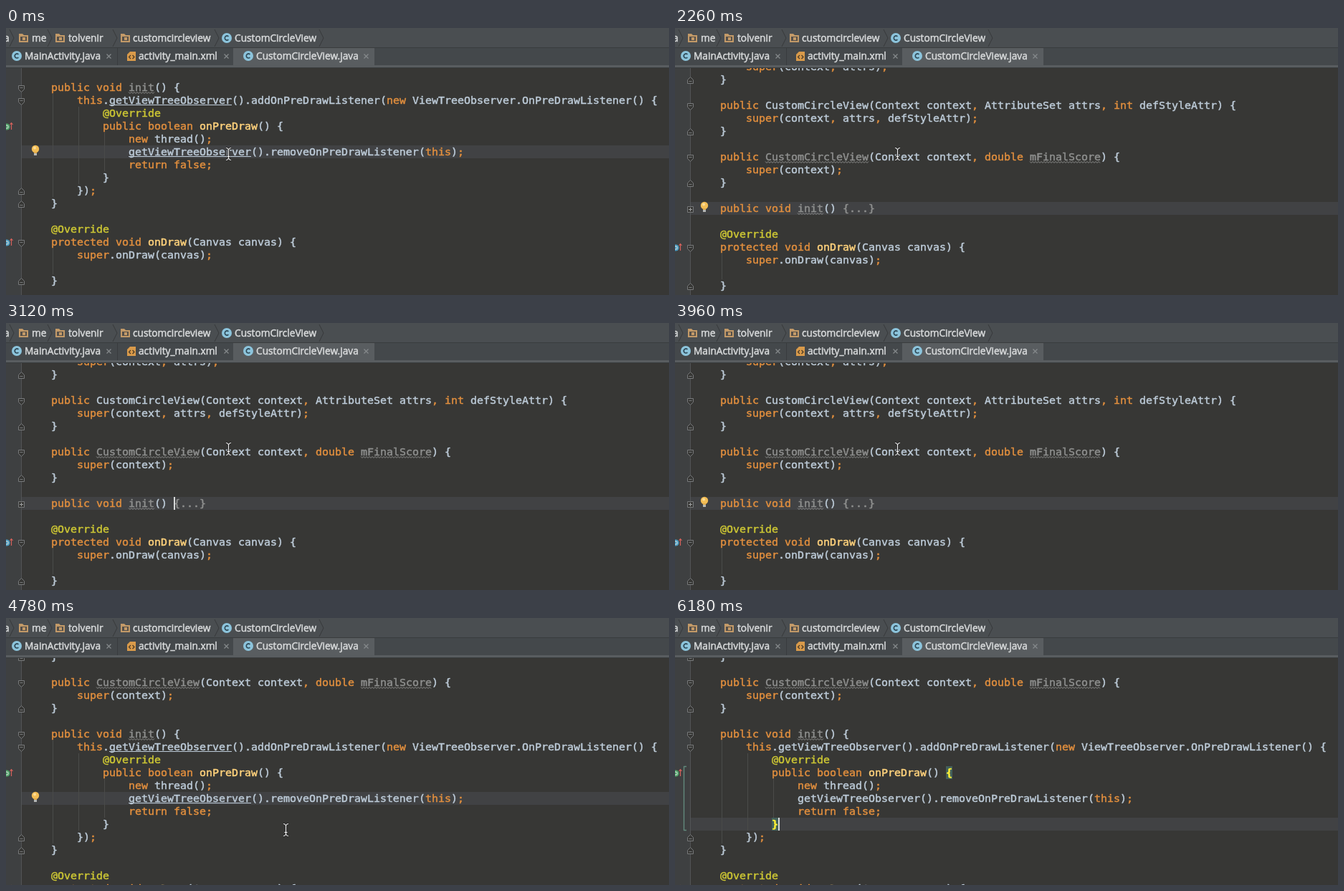
These frames come from a looping animation (925 px wide and 373 px high, 6.45 s). An HTML page with a canvas:

```html
<!DOCTYPE html>
<html lang="en">
<head>
<meta charset="utf-8">
<title>Code folding</title>
<style>
html, body { margin: 0; width: 100%; height: 100%; overflow: hidden; background: #373735; }
canvas { display: block; }
</style>
</head>
<body>
<canvas id="stage" width="925" height="373"></canvas>
<script>
const ctx = document.getElementById('stage').getContext('2d');
const LOOP = 6450, W = 925, H = 373, ROW = 18, CELL = 9, LEFT = 63, TOP = 56;
const CODE_FONT = '14.95px "DejaVu Sans Mono", monospace';
const UI_FONT = '13.7px "Open Sans", "Noto Sans", sans-serif';
const C = {
  bg: '#373735', gutter: '#3e4041', row: '#414244', bar: '#4a4e51', tab: '#44484b',
  active: '#595d60', edge: '#393c3e', text: '#bccad7', key: '#e08e3e', note: '#ccc634',
  method: '#ffd27c', dim: '#8e8f8e', ui: '#d8dadb', mark: '#77797a', guide: '#4a4b49'
};

// A leading ~ marks an unused name: grey with a wavy underline.
const LINES = `    super(context, attrs);
}

public CustomCircleView(Context context, AttributeSet attrs, int defStyleAttr) {
    super(context, attrs, defStyleAttr);
}

public ~CustomCircleView(Context context, double ~mFinalScore) {
    super(context);
}

public void ~init() {
    this.getViewTreeObserver().addOnPreDrawListener(new ViewTreeObserver.OnPreDrawListener() {
        @Override
        public boolean onPreDraw() {
            new thread();
            getViewTreeObserver().removeOnPreDrawListener(this);
            return false;
        }
    });
}

@Override
protected void onDraw(Canvas canvas) {
    super.onDraw(canvas);

}`.split('\n');
const INIT = 11, INIT_END = 20, PRE_DRAW = 14, CALL = 16, PRE_END = 18, DRAW = 23;
const STARTS = [3, 7, 11, 12, 23], ENDS = [1, 5, 9, 19, 20, 26];
const GUIDES = [[12, 19, 0], [13, 18, 4], [15, 17, 8], [24, 25, 0]]; // first, last, column
const KEYWORD = /^(public|protected|void|this|new|boolean|return|false|super|int|double|[;,])$/;
const TOKEN = /~?\w+|@\w+|\s+|[^\s\w]/g;

const CARET_FLIPS = [240, 1220, 1730, 2260, 2320, 3960, 4050, 4780, 4840, 5680, 6180];
const MOUSE = [[0, 310, 176], [4385, 310, 176], [4540, 390, 296], [5080, 390, 296],
  [5300, 729, 351], [5480, 812, 364], [5700, 856, 376]];
const within = (t, ...spans) => spans.some(([a, b]) => t >= a && t < b);

function rect(x, y, w, h, color) {
  ctx.fillStyle = color;
  ctx.fillRect(x, y, w, h);
}

function path(points, stroke, fill, width = 1) {
  ctx.beginPath();
  points.forEach(([x, y]) => ctx.lineTo(x, y));
  if (fill) {
    ctx.closePath();
    ctx.fillStyle = fill;
    ctx.fill();
  }
  if (stroke) {
    ctx.strokeStyle = stroke;
    ctx.lineWidth = width;
    ctx.stroke();
  }
}

function disc(x, y, r, color) {
  ctx.beginPath();
  ctx.arc(x, y, r, 0, 7);
  ctx.fillStyle = color;
  ctx.fill();
}

// The thin outline gives the slightly heavy look of smoothed screen text.
function label(text, x, y, color = C.ui, font = UI_FONT) {
  ctx.font = font;
  ctx.fillStyle = ctx.strokeStyle = color;
  ctx.lineWidth = .5;
  ctx.lineJoin = 'round';
  ctx.fillText(text, x, y);
  ctx.strokeText(text, x, y);
}

function classIcon(x, y) {
  disc(x, y, 7, '#8cc4dc');
  ctx.beginPath();
  ctx.arc(x + .3, y, 3, .8, 5.5);
  ctx.strokeStyle = '#2f4a58';
  ctx.lineWidth = 1.6;
  ctx.stroke();
}

function folder(x) {
  path([[x, 8], [x + 5, 8], [x + 7, 10], [x + 13, 10], [x + 13, 20], [x, 20]], null, '#c39a68');
  rect(x + 2, 12, 9, 6, '#55504a');
  rect(x + 5, 13, 4, 4, '#c39a68');
}

function xmlIcon(x, y) {
  path([[x + 4, y], [x + 12, y], [x + 12, y + 13], [x, y + 13], [x, y + 4]], null, '#d99a4a');
  path([[x + 5, y + 5], [x + 2.5, y + 7.5], [x + 5, y + 10]], '#4a3a26', null, 1.3);
  path([[x + 7.5, y + 5], [x + 10, y + 7.5], [x + 7.5, y + 10]], '#4a3a26', null, 1.3);
}

function cross(x, y) {
  path([[x - 3, y - 3], [x + 3, y + 3]], '#85898b', null, 1.3);
  path([[x - 3, y + 3], [x + 3, y - 3]], '#85898b', null, 1.3);
}

function header() {
  rect(0, 0, W, 28, C.bar);
  rect(0, 27, W, 1, C.edge);
  rect(0, 28, W, 24, C.tab);
  rect(317, 28, 197, 24, C.active);
  rect(155, 28, 1, 24, C.edge);
  rect(0, 52, W, 3, C.active);
  rect(0, 55, W, 1, C.edge);

  label('a', -3, 19);
  [8, 61, 152, 294, 440].forEach(x =>
    path([[x - 3, 2], [x + 3, 14], [x - 3, 26]], '#37393b'));
  [18, 69, 160].forEach(folder);
  label('me', 36, 19);
  label('tolvenir', 87, 19);
  label('customcircleview', 177, 19);
  classIcon(308, 14);
  label('CustomCircleView', 319, 19);

  classIcon(15, 39);
  label('MainActivity.java', 26, 44);
  cross(143.5, 39.5);
  xmlIcon(169, 33);
  label('activity_main.xml', 185, 44);
  cross(307.5, 39.5);
  classIcon(338, 39);
  label('CustomCircleView.java', 349, 44);
  cross(502.5, 39.5);
}

function wave(x, y, width) {
  const points = [];
  for (let i = 0; i <= width; i += 2) points.push([x + i, y + (i % 4 ? 2 : 0)]);
  path(points, C.dim);
}

function colorOf(token, before) {
  if (token[0] === '~') return C.dim;
  if (token[0] === '@') return C.note;
  if (KEYWORD.test(token)) return C.key;
  return /^on/.test(token) && /(void|boolean) $/.test(before) ? C.method : C.text;
}

function codeLine(line, y, underline) {
  let before = '';
  for (const token of line.match(TOKEN) || []) {
    const word = token.replace('~', ''), x = LEFT + before.length * CELL;
    const width = word.length * CELL;
    label(word, x, y + 14, colorOf(token, before), CODE_FONT);
    if (token !== word) wave(x, y + 15.5, width);
    if (underline && word === 'getViewTreeObserver') rect(x, y + 15, width, 1, C.text);
    before += word;
  }
}

function foldMark(y, dir) {
  const cy = y + 10.5, tip = [[17.5, -4], [25.5, -4], [25.5, 1], [21.5, 5], [17.5, 1]];
  path([...tip, tip[0]].map(([x, d]) => [x, cy + d * dir]), C.mark, C.bg);
  path([[19.5, cy - dir], [23.5, cy - dir]], C.mark);
}

function plusMark(y) {
  ctx.fillStyle = C.bg;
  ctx.fillRect(17, y + 6, 9, 9);
  ctx.strokeStyle = C.mark;
  ctx.lineWidth = 1;
  ctx.strokeRect(17.5, y + 6.5, 8, 8);
  path([[19, y + 10.5], [24, y + 10.5]], '#a0a2a3');
  path([[21.5, y + 8], [21.5, y + 13]], '#a0a2a3');
}

function overrideMark(y, color) {
  disc(1, y + 10, 4.6, color);
  disc(1, y + 10, 2.6, '#cfd8d4');
  disc(1, y + 10, 1.6, color);
  path([[7.5, y + 14], [7.5, y + 5]], '#d8625c', null, 1.2);
  path([[5.5, y + 7], [7.5, y + 4.5], [9.5, y + 7]], '#d8625c', null, 1.2);
}

function bulb(y) {
  disc(41, y + 5, 5.2, '#f3bd55');
  disc(40, y + 3.5, 2, '#fbdc98');
  rect(39, y + 9, 4, 2, '#e0ab4c');
  rect(39, y + 11, 4, 3, '#b5b6b4');
}

function brace(char, col, y) {
  const x = LEFT + col * CELL;
  rect(x, y, CELL, ROW, '#43605a');
  label(char, x, y + 14, '#fff035', 'bold ' + CODE_FONT);
}

function mouse(t) {
  if (t >= 5700) return;
  const i = MOUSE.findIndex(p => p[0] > t), [a, b] = [MOUSE[i - 1], MOUSE[i]];
  const k = (t - a[0]) / (b[0] - a[0]);
  const x = Math.round(a[1] + (b[1] - a[1]) * k) + .5, y = Math.round(a[2] + (b[2] - a[2]) * k);
  for (const [color, width] of [['#222', 3], ['#f2f2f2', 1.2]]) {
    path([[x - 3.5, y - 8.5], [x - 1.5, y - 8], [x, y - 6], [x, y + 6],
      [x - 1.5, y + 8], [x - 3.5, y + 8.5]], color, null, width);
    path([[x + 3.5, y - 8.5], [x + 1.5, y - 8], [x, y - 6]], color, null, width);
    path([[x, y + 6], [x + 1.5, y + 8], [x + 3.5, y + 8.5]], color, null, width);
    path([[x - 2, y + 3.5], [x + 2, y + 3.5]], color, null, width);
  }
}

function draw(t) {
  const folded = within(t, [380, 2320], [3120, 4050]);
  const underline = within(t, [0, 380], [2620, 3120], [4280, 5130]);
  const clicked = t >= 4840;
  const origin = t < 380 ? -124 : folded ? 45 : -45;
  const hidden = i => folded && i > INIT && i <= INIT_END;
  const yOf = i => origin + ROW * (folded && i > INIT_END ? i - INIT_END + INIT : i);
  const [caretLine, caretCol] = folded ? [INIT, 19] : clicked ? [PRE_END, 9] : [CALL, 28];
  const caretY = yOf(caretLine);

  rect(0, 0, W, H, C.bg);
  rect(0, TOP, 21, H, C.gutter);
  rect(22, caretY, W, ROW, C.row);
  rect(21, TOP, 1, H, '#525456');

  for (const [first, last, col] of GUIDES)
    if (!hidden(first)) rect(LEFT + col * CELL + 2, yOf(first), 1, (last - first + 1) * ROW, C.guide);

  LINES.forEach((line, i) => {
    if (hidden(i)) return;
    const y = yOf(i), closed = folded && i === INIT;
    codeLine(closed ? line.slice(0, -1) : line, y, underline);
    if (closed) {
      label('{...}', LEFT + 19 * CELL, y + 14, C.dim, CODE_FONT);
      plusMark(y);
    } else if (STARTS.includes(i)) foldMark(y, 1);
    else if (ENDS.includes(i)) foldMark(y, -1);
    if (i === PRE_DRAW) overrideMark(y, '#4fa468');
    if (i === DRAW) overrideMark(y, '#4b9cc4');
  });

  if (clicked) {
    brace('{', 35, yOf(PRE_DRAW));
    brace('}', 8, yOf(PRE_END));
  }
  if (t >= 5130) {
    const a = yOf(PRE_DRAW) + .5, b = yOf(PRE_END) + ROW - .5;
    path([[16, a], [12.5, a], [12.5, b], [16, b]], '#62897c', null, 1.4);
  }
  if (within(t, [0, 380], [1220, 2320], [3960, 4050], [4780, 4840])) bulb(caretY);
  if (CARET_FLIPS.filter(f => f <= t).length % 2)
    rect(LEFT + caretCol * CELL, caretY, 2, ROW, '#d6d8d8');

  header();
  mouse(t);
}

const begin = performance.now();
function frame() {
  draw((performance.now() - begin) % LOOP);
  requestAnimationFrame(frame);
}
frame();
</script>
</body>
</html>
```
